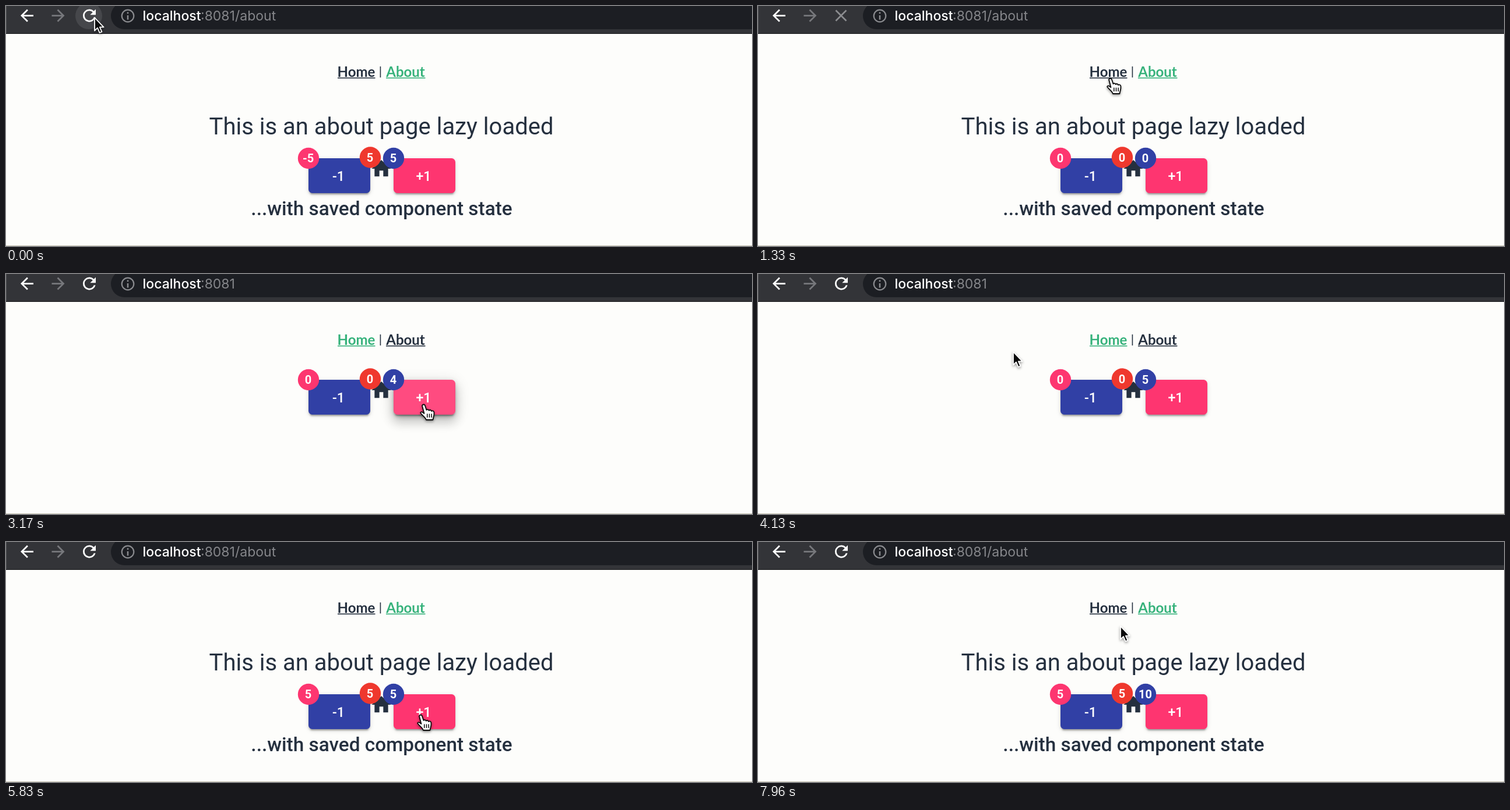
Write an HTML page that moves like this. It is 1280 px wide and 413 px high and loops after 8 s.

```html
<!DOCTYPE html>
<html lang="en">
<head>
<meta charset="utf-8">
<title>Lazy loaded page with saved state</title>
<style>
  html, body { margin: 0; width: 100%; height: 100%; overflow: hidden; background: #fdfdfb; }
  #stage { position: relative; width: 1280px; height: 413px; overflow: hidden; }
  #buttons { position: absolute; inset: 0; }
  .btn, .press { position: absolute; width: 106px; height: 60px; border-radius: 6.5px; }
  .btn {
    top: 262px;
    box-shadow: 0 5px 2px -3px #0003, 0 3px 3px #00000024, 0 2px 8px #0000001f;
  }
  .press { inset: 0; opacity: 0; box-shadow: 0 8px 8px -5px #0003, 0 13px 17px 2px #00000024, 0 5px 23px 3px #0000001f; }
  #minus { left: 519px; background: #3140a5; }
  #plus { left: 665px; background: #fe3570; }
  svg { position: absolute; inset: 0; }
  text { font-family: Roboto, sans-serif; fill: #25303f; }
  .mid { text-anchor: middle; }
  .label { font-size: 23.3px; font-weight: 500; fill: #fff; }
  .badge { font-size: 20px; font-weight: 700; fill: #fff; }
  .link { font: 700 24px Lato, sans-serif; }
  .url { font: 400 23px Inter, sans-serif; fill: #85868a; }
  .host { font-weight: 500; fill: #fff; }
</style>
</head>
<body>
<div id="stage">
  <div id="buttons">
    <div class="btn" id="minus"></div>
    <div class="btn" id="plus"><div class="press" id="press"></div></div>
  </div>
  <svg width="1280" height="413" viewBox="0 0 1280 413">
    <defs>
      <path id="back" d="M20 11H7.83l5.59-5.59L12 4l-8 8 8 8 1.41-1.41L7.83 13H20z"/>
    </defs>

    <!-- toolbar -->
    <rect width="1280" height="48" fill="#333438"/>
    <rect y="47" width="1280" height="1" fill="#151619"/>
    <rect width="1" height="47" fill="#55565a"/>
    <path d="M1280 -6H203a23 23 0 0 0 0 46H1280z" fill="#1c1e23"/>
    <circle id="halo" cx="142" cy="17" r="23" fill="#46474b"/>
    <use href="#back" transform="translate(19.5) scale(1.375)" fill="#fff"/>
    <use href="#back" transform="translate(106) scale(-1.375 1.375)" fill="#77787c"/>
    <path id="reload" transform="translate(126.5) scale(1.375)" fill="#fff" d="M17.65 6.35C16.2 4.9 14.21 4 12 4a8 8 0 1 0 7.73 10h-2.08A6 6 0 1 1 12 6c1.66 0 3.14.69 4.22 1.78L13 11h7V4z"/>
    <path id="stop" d="M133.5 7.5l18 18m0-18l-18 18" stroke="#8c8d90" stroke-width="2.6"/>
    <circle cx="209" cy="17" r="10.3" fill="none" stroke="#8a8b8f" stroke-width="2.2"/>
    <path d="M209 10.5v2.8m0 2.6v7.6" stroke="#8a8b8f" stroke-width="2.5"/>
    <text class="url host" x="234.5" y="25">localhost</text>
    <text class="url" id="path" x="334" y="25"></text>

    <!-- navigation -->
    <g id="home"><text class="link mid" x="601" y="121.5">Home</text><rect x="569" y="123" width="64.5" height="1.6"/></g>
    <text class="mid" x="642.5" y="120" font-size="22">|</text>
    <g id="about"><text class="link mid" x="685.5" y="121.5">About</text><rect x="652" y="123" width="67.5" height="1.6"/></g>

    <g id="copy">
      <text class="mid" x="644" y="221" font-size="40">This is an about page lazy loaded</text>
      <text class="mid" x="644.5" y="360" font-size="33.33" font-weight="500">...with saved component state</text>
    </g>

    <g id="counter">
      <path transform="translate(624 260) scale(1.667)" fill="#25303f" d="M10 20v-6h4v6h5v-8h3L12 3 2 12h3v8z"/>
      <text class="label mid" x="570.5" y="300.5">-1</text>
      <text class="label mid" x="716.5" y="300.5">+1</text>
      <circle cx="519" cy="262" r="18.2" fill="#fd3670"/>
      <circle cx="625" cy="260.5" r="18.2" fill="#ef382e"/>
      <circle cx="665" cy="262" r="18.2" fill="#3140a5"/>
      <text class="badge mid" id="low" x="518.5" y="269"></text>
      <text class="badge mid" id="start" x="624.5" y="267.5"></text>
      <text class="badge mid" id="high" x="664.5" y="269"></text>
    </g>

    <rect y="412" width="1280" height="1" fill="#c6c2b2"/>

    <g id="pointer">
      <g id="ring" fill="none">
        <circle r="49.3" stroke="#fff" stroke-width="1.6"/>
        <circle r="51" stroke="#0b0b0b" stroke-width="2.4"/>
      </g>
      <g style="filter: drop-shadow(0 2px 2px #0006)" stroke-linejoin="round">
        <path id="arrow" d="M1 1V23.5L6 18.7L9.6 27L13.4 25.4L9.9 17.3H16.6Z" fill="#0b0b0b" stroke="#fff" stroke-width="1.8"/>
        <g id="hand" fill="#fff" stroke="#0b0b0b" stroke-width="1.8">
          <path d="M-3 1.5C-2-1.2 1-1 1.8 1L4.5 9C5.5 7.5 8 8 8.8 9.8C10.5 8.3 12.5 9 13 11C15 9.5 17.5 11 17.5 13.5C18 19 16 21 15.5 26H4C3 22-1 20-5.5 14.5C-6.5 12.5-4 11.5-1.5 13.5L.5 15Z"/>
          <path d="M5.8 15.5v6.5m3.7-6.5v6.5m3.7-6.5v6.5" stroke-width="1.5"/>
        </g>
      </g>
    </g>
  </svg>
</div>
<script>
const LOOP = 8000;
const $ = id => document.getElementById(id);
const clamp = v => Math.max(0, Math.min(1, v));
const within = (v, a, b) => v >= a && v < b;
const show = (id, on) => $(id).style.display = on ? "" : "none";

// Pointer stops: time, x, y
const stops = [
  [0, 151, 19], [420, 151, 19], [1080, 606, 124], [1330, 605, 125], [1780, 605, 121],
  [2270, 717, 225], [3400, 717, 225], [4130, 437, 133], [4300, 437, 133],
  [5000, 685, 117], [5270, 685, 117], [5810, 712, 298], [6000, 712, 298],
  [6500, 708, 297], [7480, 708, 297], [7940, 621, 144], [8000, 621, 144]
];
const series = (first, gap) => Array.from({ length: 5 }, (_, i) => first + i * gap);
const homeClicks = series(2350, 210);
const aboutClicks = series(6640, 175);
const plusClicks = [...homeClicks, ...aboutClicks];
const presses = [120, 1590, 5100, ...plusClicks];

const RESET = 870, GO_HOME = 1720, GO_ABOUT = 5220;

function pointerAt(t) {
  const i = Math.max(1, stops.findIndex(s => s[0] > t));
  const [t0, x0, y0] = stops[i - 1], [t1, x1, y1] = stops[i];
  const p = clamp((t - t0) / (t1 - t0)), e = p * p * (3 - 2 * p);
  return [x0 + (x1 - x0) * e, y0 + (y1 - y0) * e];
}

function countsAt(t) {
  const clicked = list => list.filter(c => t >= c + 50).length;
  if (t < RESET) return [-5, 5, 5];
  if (t < GO_ABOUT) return [0, 0, clicked(homeClicks)];
  return [5, 5, 5 + clicked(aboutClicks)];
}

function draw(t) {
  const onHome = within(t, GO_HOME, GO_ABOUT);
  const shift = onHome ? -80 : 0;
  const [x, y] = pointerAt(t);

  show("copy", !onHome);
  $("path").textContent = onHome ? ":8081" : ":8081/about";
  $("home").style.fill = $("home").firstChild.style.fill = onHome ? "#36b27b" : "#25303f";
  $("about").style.fill = $("about").firstChild.style.fill = onHome ? "#25303f" : "#36b27b";
  $("buttons").style.transform = `translateY(${shift}px)`;
  $("counter").setAttribute("transform", `translate(0 ${shift})`);

  const loading = within(t, 260, GO_HOME);
  show("reload", !loading);
  show("stop", loading);
  $("halo").style.opacity = 1 - clamp((t - 500) / 150);

  const [low, start, high] = countsAt(t);
  $("low").textContent = low;
  $("start").textContent = start;
  $("high").textContent = high;

  const lit = within(t, 2260, 3520) || within(t, 5860, 7590);
  $("plus").style.background = lit ? "#ff4b80" : "#fe3570";
  $("press").style.opacity = Math.max(...plusClicks.map(c =>
    clamp((t - c - 60) / 80) * clamp((c + 420 - t) / 200)));

  const overLink = within(y, 98, 130) && (within(x, 567, 635) || within(x, 651, 721));
  const overButton = within(y, 262 + shift, 322 + shift) && (within(x, 519, 625) || within(x, 665, 771));
  const hand = overLink || overButton;
  show("hand", hand);
  show("arrow", !hand);
  show("ring", presses.some(c => within(t, c, c + 110)));
  $("pointer").setAttribute("transform", `translate(${x} ${y})`);
}

function tick() {
  draw(performance.now() % LOOP);
  requestAnimationFrame(tick);
}
tick();
</script>
</body>
</html>
```
